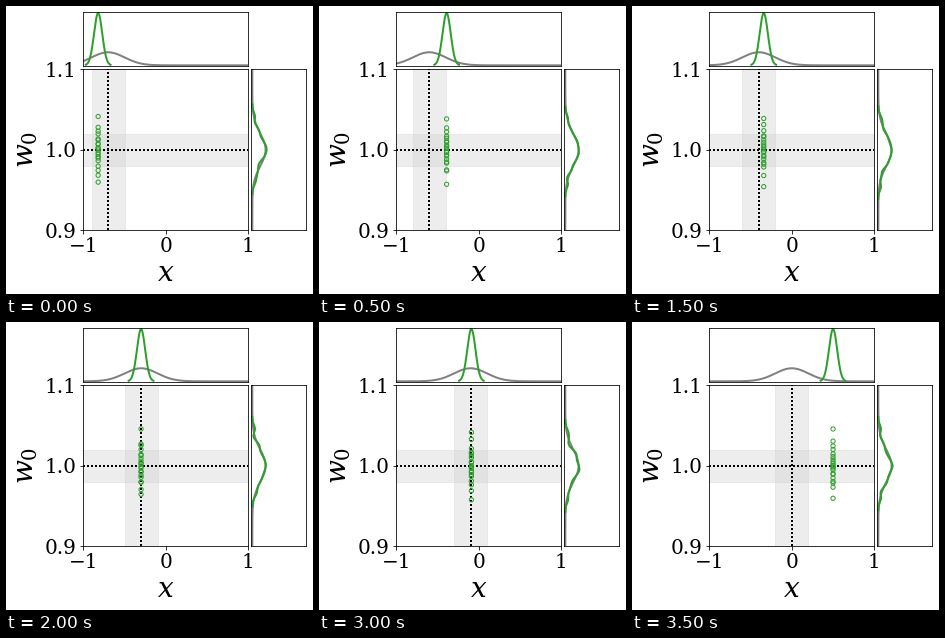
Recreate the animation shown at these times as a matplotlib script. Size 307x288 px, loop 6000 ms.

```python
import numpy as np
import matplotlib.pyplot as plt
from matplotlib.animation import FuncAnimation

WIDTH, HEIGHT, DPI = 307, 288, 72
GREEN, BAND = "#2ca02c", "lightgray"
PRIOR_X, PRIOR_W = 0.2, 0.02        # prior standard deviations
KERNEL_X, KERNEL_W = 0.05, 0.005    # kernel bandwidths
STEPS, SAMPLES = 8, 20

plt.rcParams.update({
    "font.family": "DejaVu Serif",
    "mathtext.fontset": "dejavuserif",
    "font.size": 20,
    "toolbar": "None",
})


def sample_x(step):
    """The sampled x drifts slowly, with a jump at either end."""
    return np.interp(step, [0, 1, 3, 5, 6, 7],
                     [-0.82, -0.39, -0.34, -0.26, -0.09, 0.5])


def sample_w(step):
    """Stratified, nearly normal draws around 1 (logistic quantiles)."""
    rng = np.random.default_rng(step)
    u = (np.arange(SAMPLES) + rng.uniform(0, 1, SAMPLES)) / SAMPLES
    u = u.clip(0.02, 0.98)
    return 1 + PRIOR_W / 1.7 * np.log(u / (1 - u))


def normal(t, mean, sd):
    return np.exp(-0.5 * ((t - mean) / sd) ** 2) / (sd * np.sqrt(2 * np.pi))


def kde(points, width):
    grid = np.linspace(points.min() - 3 * width, points.max() + 3 * width, 300)
    return grid, normal(grid[:, None], points, width).mean(axis=1)


fig = plt.figure(figsize=(WIDTH / DPI, HEIGHT / DPI), dpi=DPI)


def panel(left, top, right, bottom):
    return fig.add_axes([left / WIDTH, 1 - bottom / HEIGHT,
                         (right - left) / WIDTH, (bottom - top) / HEIGHT])


main = panel(77.3, 63.3, 242.3, 224.3)
upper = panel(77.3, 6.3, 242.3, 60.3)
side = panel(245.3, 63.3, 300.3, 224.3)
grid_x = np.linspace(-1, 1, 400)
grid_w = np.linspace(0.9, 1.1, 400)


def draw(frame):
    step = min(frame, STEPS - 1)
    center = (step - 7) / 10
    x, w = sample_x(step), sample_w(step)
    for ax in (main, upper, side):
        ax.clear()

    main.axvspan(center - PRIOR_X, center + PRIOR_X, color=BAND, alpha=0.4)
    main.axhspan(1 - PRIOR_W, 1 + PRIOR_W, color=BAND, alpha=0.4)
    dotted = dict(color="k", ls=(0, (1, 1)), lw=2)
    main.axvline(center, **dotted)
    main.axhline(1, **dotted)
    main.scatter(np.full(SAMPLES, x), w, s=18, facecolors="none",
                 edgecolors=GREEN, linewidths=1, zorder=3)
    main.set(xlim=(-1, 1), ylim=(0.9, 1.1),
             xticks=[-1, 0, 1], yticks=[0.9, 1.0, 1.1])
    main.set_xlabel("$x$", fontsize=28)
    main.set_ylabel("$w_0$", fontsize=28)

    upper.plot(grid_x, normal(grid_x, center, PRIOR_X), color="gray", lw=2)
    upper.plot(*kde(np.array([x]), KERNEL_X), color=GREEN, lw=2)
    upper.set(xlim=(-1, 1), ylim=(-0.15, 8.1), xticks=[], yticks=[])

    side.plot(normal(grid_w, 1, PRIOR_W), grid_w, color="gray", lw=2)
    levels, density = kde(w, KERNEL_W)
    side.plot(density, levels, color=GREEN, lw=2)
    side.set(xlim=(-1.5, 81), ylim=(0.9, 1.1), xticks=[], yticks=[])
    return []


anim = FuncAnimation(fig, draw, frames=12, interval=500, repeat=True,
                     repeat_delay=0, init_func=lambda: draw(0))
plt.show()
```
